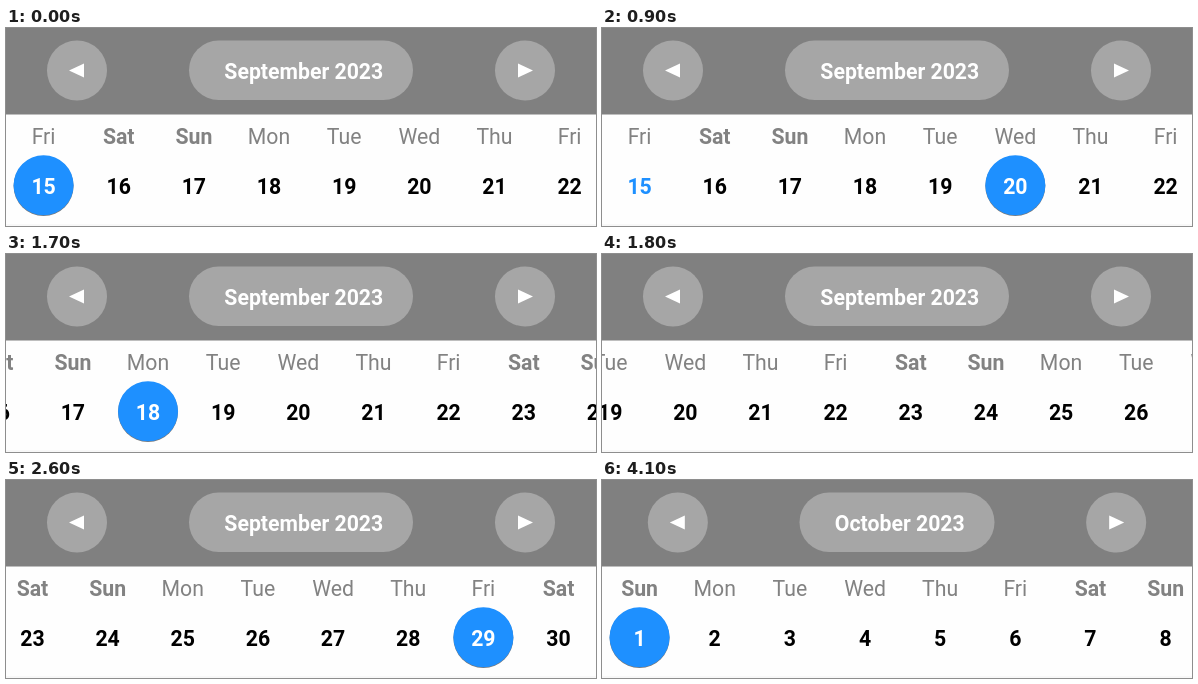
These frames come from a looping animation (590x198 px, 5.8 s). An HTML page:

```html
<!DOCTYPE html>
<html lang="en">
<head>
<meta charset="utf-8">
<title>Date strip</title>
<style>
  html, body { margin: 0; width: 100%; height: 100%; overflow: hidden; background: #fff; }
  svg { display: block; width: 590px; height: 198px; }
  text { font: 700 21.25px Roboto, sans-serif; text-anchor: middle; }
  .name { fill: #828282; font-weight: 400; }
  .weekend { font-weight: 700; }
  .today { fill: #1e90ff; }
  .picked { fill: #fff; }
  .white { fill: #fff; }
  .chip { fill: #a6a6a6; }
</style>
</head>
<body>
<svg id="stage" viewBox="0 0 590 198">
  <rect width="590" height="198" fill="#fefefe"/>
  <rect y="196" width="590" height="2" fill="#f8f8f8"/>
  <rect width="590" height="86.5" fill="#808080"/>
  <g id="prev">
    <circle class="chip" cy="42.5" r="30"/>
    <path class="white" d="M-8 42.5 L7 35.5 V49.5 Z"/>
  </g>
  <rect id="pill" class="chip" y="12.5" height="59.5" rx="29.75"/>
  <text id="title" class="white" x="298" y="51"></text>
  <g id="next">
    <circle class="chip" cy="42.5" r="30"/>
    <path class="white" d="M8 42.5 L-7 35.5 V49.5 Z"/>
  </g>
</svg>
<script>
const LOOP = 5800, STEP = 100, WIDTH = 590, PITCH = 75.15, BUTTON = 60;
const DAYS = ["Sun", "Mon", "Tue", "Wed", "Thu", "Fri", "Sat"];
const MONTHS = [
  { title: "September 2023", index: 8, first: 15, last: 30, pill: 224 },
  { title: "October 2023", index: 9, first: 1, last: 9, pill: 195 }
];
const $ = id => document.getElementById(id);
const stage = $("stage");

// Each entry is [start in ms, value], held until the next one.
const month = [[0, 0], [3900, 1]];
const picked = [[0, 15], [600, 20], [1300, 18], [2500, 29], [3900, 1]];
const scroll = [[0, 0], [1700, 121], [1800, 330], [1900, 520], [2000, 612.3]];
const nextOpacity = [[0, 1], [3400, 0.2], [3900, 0.3], [4000, 0.75], [4100, 1]];
const at = (track, t) => track.filter(([start]) => start <= t).pop()[1];

function add(parent, tag, attrs, content = "") {
  const el = document.createElementNS("http://www.w3.org/2000/svg", tag);
  for (const key in attrs) el.setAttribute(key, attrs[key]);
  el.textContent = content;
  parent.append(el);
  return el;
}

const strips = MONTHS.map(m => {
  const group = add(stage, "g", {});
  const marker = add(group, "g", {});
  add(marker, "circle", { cy: 158, r: 30, fill: "#77797c" });
  add(marker, "circle", { cy: 157.2, r: 30, fill: "#1e90ff" });
  const numbers = {};
  for (let day = m.first; day <= m.last; day++) {
    const x = PITCH * (day - m.first + 0.5);
    const weekday = new Date(2023, m.index, day).getDay();
    const weekend = weekday % 6 === 0 ? " weekend" : "";
    add(group, "text", { x, y: 116, class: "name" + weekend }, DAYS[weekday]);
    numbers[day] = add(group, "text", { x, y: 166 }, day);
  }
  return { group, marker, numbers };
});

function draw(t) {
  const current = at(month, t), m = MONTHS[current], day = at(picked, t);
  const margin = (WIDTH - 2 * BUTTON - m.pill) / 6;
  const shift = (el, x) => el.setAttribute("transform", `translate(${x} 0)`);

  shift($("prev"), margin + BUTTON / 2);
  shift($("next"), WIDTH - margin - BUTTON / 2);
  $("next").setAttribute("opacity", at(nextOpacity, t));
  $("pill").setAttribute("width", m.pill);
  $("pill").setAttribute("x", (WIDTH - m.pill) / 2);
  $("title").textContent = m.title;
  $("title").setAttribute("x", WIDTH / 2 + 2.8);

  strips.forEach((s, i) => s.group.setAttribute("display", i === current ? "inline" : "none"));
  const strip = strips[current];
  shift(strip.group, current === 0 ? -at(scroll, t) : 0);
  shift(strip.marker, PITCH * (day - m.first + 0.5));
  for (const d in strip.numbers) {
    const today = current === 0 && +d === 15;
    strip.numbers[d].setAttribute("class", +d === day ? "picked" : today ? "today" : "");
  }
}

let shown = -1;
function frame() {
  const t = Math.floor(performance.now() % LOOP / STEP) * STEP;
  if (t !== shown) draw(shown = t);
  requestAnimationFrame(frame);
}
frame();
</script>
</body>
</html>
```
